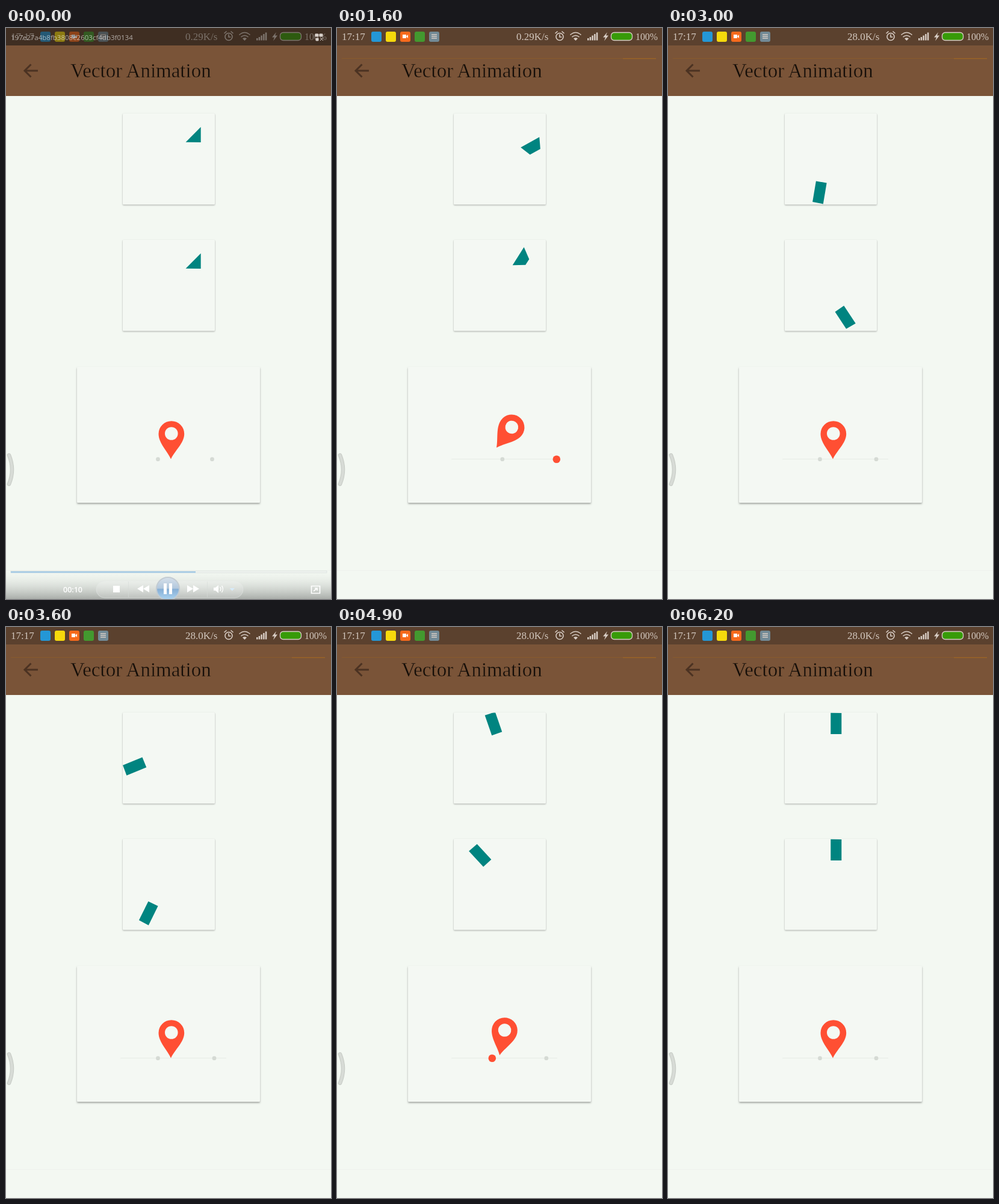
These frames come from a looping animation (540x949 px, 6.3 s). An HTML page:

```html
<!DOCTYPE html>
<html lang="en">
<head>
<meta charset="utf-8">
<title>Vector Animation</title>
<style>
html, body { margin: 0; width: 100%; height: 100%; overflow: hidden; background: #f3f8f2; }
svg { display: block; width: 540px; height: 949px; }
text { font-family: "Liberation Serif", serif; white-space: pre; }
.status { font-size: 17px; fill: #d3c8bf; }
.title { font-size: 33px; fill: #130d08; stroke: #7a5438; stroke-width: .5px; }
.sans { font-family: "Open Sans", sans-serif; fill: #fff; }
.card { fill: #f4f8f3; filter: drop-shadow(0 1px 1.2px rgba(0, 0, 0, .32)); }
.raised { filter: drop-shadow(0 2px 1.5px rgba(0, 0, 0, .32)); }
.line { fill: none; stroke: #d8cdc5; stroke-width: 1.6; }
</style>
</head>
<body>
<svg viewBox="0 0 540 949">
  <defs>
    <linearGradient id="shade" x2="0" y2="1">
      <stop stop-color="#f3f8f2" stop-opacity="0"/><stop offset="1" stop-color="#a9ada9"/>
    </linearGradient>
    <linearGradient id="glass" x2="0" y2="1">
      <stop stop-color="#d6e0ea"/><stop offset=".48" stop-color="#b3c8dd"/>
      <stop offset=".52" stop-color="#86aed5"/><stop offset="1" stop-color="#aed6f2"/>
    </linearGradient>
    <clipPath id="clipA"><rect x="194" y="142.5" width="153" height="151"/></clipPath>
    <clipPath id="clipB"><rect x="194" y="352.5" width="153" height="151"/></clipPath>
  </defs>

  <rect width="540" height="949" fill="#f3f8f2"/>
  <rect width="540" height="113" fill="#7a5438"/>
  <rect width="540" height="29" fill="#5b412e"/>
  <g id="streak" fill="#895a2c">
    <rect x="8" y="50" width="522" height="1"/>
    <rect x="475" y="50" width="55" height="1.5" fill="#9a6426"/>
  </g>

  <text class="status" x="8" y="20">17:17</text>
  <rect x="57" y="6" width="17" height="17" rx="3" fill="#2497d6"/>
  <rect x="81" y="6" width="17" height="17" rx="3" fill="#f6d90c"/>
  <rect x="105" y="6" width="17" height="17" rx="3" fill="#f76a1c"/>
  <path d="M109 11h6v6h-6zM115 14l3-3v6z" fill="#fff"/>
  <rect x="129" y="6" width="17" height="17" rx="3" fill="#43992f"/>
  <rect x="153" y="6" width="17" height="17" rx="3" fill="#728a96"/>
  <path d="M157 11h9M157 14h9M157 17h9" class="line"/>
  <text id="speed" class="status" x="298" y="20"></text>
  <g class="line">
    <circle cx="370" cy="14.5" r="6"/>
    <path d="M370 10.5v4.5h3.5M362.500 9l4-3.500M377.500 9l-4-3.500M387.500 11.500q9-8 18 0M390.500 15q6-5 12 0"/>
  </g>
  <path d="M393 17.500q3.500-2.500 7 0l-3.500 3.500zM416 17h2.500v3.500H416zM419.700 15h2.500v5.500h-2.500zM423.400 12.500h2.500v8h-2.500zM427.100 10h2.500v10.500h-2.500zM430.800 7.500h2.500v13h-2.500zM449 7l-7 8.500h4l-2 6 7-9h-4z" fill="#d8cdc5"/>
  <rect x="455.500" y="7.500" width="35" height="13" rx="5" fill="#379b08" stroke="#d8cdc5" stroke-width="1.300"/>
  <text class="status" x="496" y="20" style="font-size: 15.8px">100%</text>

  <path d="M53 71H31M41.500 60.500L31 71l10.500 10.500" fill="none" stroke="#4b3222" stroke-width="3"/>
  <text class="title" x="107" y="82">Vector Animation</text>

  <rect class="card" x="194" y="142" width="153" height="151.500" rx="1.500"/>
  <rect class="card" x="194" y="352" width="153" height="151.500" rx="1.500"/>
  <rect class="card raised" x="118" y="563" width="304" height="226" rx="1.500"/>
  <g fill="#008480">
    <g clip-path="url(#clipA)"><polygon id="shapeA"/></g>
    <g clip-path="url(#clipB)"><polygon id="shapeB"/></g>
  </g>
  <path id="track" d="M190 716.500H366" stroke="#eaefe9" stroke-width="1.500"/>
  <g id="dots"></g>
  <path id="pin" fill="#ff4f33" fill-rule="evenodd" d="M274 716.500C268 703 253.500 690 253.500 674.500A21.300 21.300 0 0 1 296.200 674.500C296.200 690 280 703 274 716.500ZM264 674a10.800 10.800 0 1 0 21.600 0a10.800 10.800 0 1 0-21.600 0Z"/>

  <g fill="none" stroke-linecap="round">
    <path d="M5 710q10 24 0 48" stroke="#c6cbc5" stroke-width="6.500"/>
    <path d="M5 710q10 24 0 48" stroke="#d7dbd6" stroke-width="4.500"/>
  </g>
  <rect y="901" width="540" height="1" fill="#eef2ed"/>

  <g id="player">
    <rect width="540" height="29" fill="#241c16" opacity=".5"/>
    <text class="sans" x="8" y="19.500" font-size="11.500" opacity=".6">197e27a4b8fb3808e2603cf4db3f0134</text>
    <path d="M514 10h5v4h-5zM521 10h5v4h-5zM515 17h4v4h-4zM522 16l5 5m0-5l-5 5" fill="#d8d0ca" stroke="#d8d0ca"/>
    <rect y="898" width="540" height="51" fill="url(#shade)"/>
    <rect x="8" y="902.500" width="525" height="3" fill="#f0f4f1" stroke="#d3dad8" stroke-width=".6"/>
    <rect x="8" y="903" width="307" height="2.500" fill="#a5cbe6"/>
    <text class="sans" x="95" y="938" font-size="12.500" font-weight="600">00:10</text>
    <rect x="150" y="919" width="244" height="28" rx="14" fill="#fff" fill-opacity=".18" stroke="#e3e7e4" stroke-opacity=".6"/>
    <path d="M203.500 920v26M334.500 920v26" stroke="#d6dad7" stroke-opacity=".6"/>
    <circle cx="269" cy="932" r="19" fill="url(#glass)" stroke="#c3ccd3" stroke-width="2"/>
    <path d="M178 927h11v11h-11zM228 926v12l-10-6zM238 926v12l-10-6zM301 926v12l10-6zM311 926v12l10-6zM262 923h5v18h-5zM271 923h5v18h-5zM345 930h3l5-4v13l-5-4h-3z" fill="#fff"/>
    <path d="M355.500 929q3 3.500 0 7M358.500 927q4 5.500 0 11" fill="none" stroke="#fff" stroke-width="1.300"/>
    <path d="M371.500 931h8.500l-4.200 4.500z" fill="#d6ebfa"/>
    <path d="M507.500 927.500h14v12h-14zM511 936l6-5m-4 0h4v4" fill="none" stroke="#fff" stroke-width="1.700"/>
  </g>
</svg>
<script>
const LOOP = 6300, STEP = 100;
const SPIN = 5665;
const HOP_START = 1260, HOP = 1260, HOP_PERIOD = 2500;
const SPACING = 90, FIRST_DOT = 252.5;

const $ = id => document.getElementById(id);
const ease = x => .5 - .5 * Math.cos(Math.PI * Math.min(1, Math.max(0, x)));
const show = (id, opacity) => $(id).setAttribute("opacity", opacity);

// A triangle splits its apex to become a bar while turning once around the card.
function drawShape(id, centerY, start, time) {
  const t = (time - start) / SPIN;
  const half = 17.5 * ease(2 * t);
  const angle = t < 0 ? 45 : 360 * ease(t);
  const shape = $(id);
  shape.setAttribute("points", `0,-40 0,-75.5 18,${-57.5 - half} 18,${-57.5 + half}`);
  shape.setAttribute("transform", `translate(270.3 ${centerY}) rotate(${angle})`);
}

// The dots slide left by two places, led by a red one, while the pin leans.
function drawPin(time) {
  const started = time >= HOP_START;
  const t = started ? (time - HOP_START) % HOP_PERIOD / HOP : 1;
  const moving = t < 1;
  const shift = moving ? 2 * SPACING * (1 - (1 - t) ** 1.5) : 0;
  let dots = "";
  for (let i = 0; i < 4; i++) {
    let x = FIRST_DOT + SPACING * i - shift;
    if (!moving && started && i === 1) x = 346;
    if (x < 187 || x > 371) continue;
    const red = moving && i === 2;
    dots += `<circle cx="${x}" cy="716.7" r="${red ? 6.3 : 3.4}" fill="${red ? "#ff4f33" : "#d5dad4"}"/>`;
  }
  $("dots").innerHTML = dots;
  const peak = .27;
  const lean = !moving ? 0 : t < peak ? ease(t / peak) : 1 - ((t - peak) / (1 - peak)) ** 2.4;
  $("pin").setAttribute("transform", `rotate(${35.5 * lean} 299 693)`);
  show("track", started ? 1 : 0);
}

function draw(now) {
  const time = Math.floor(now % LOOP / STEP) * STEP;
  drawShape("shapeA", 218, 72, time);
  drawShape("shapeB", 428, 503, time);
  drawPin(time);
  $("speed").textContent = time < 3000 ? "0.29K/s" : "28.0K/s";
  const fade = Math.max(0, 1 - time / 700);
  show("player", fade);
  show("streak", 1 - fade);
}

let origin;
function tick(now) {
  origin ??= now;
  draw(now - origin);
  requestAnimationFrame(tick);
}
draw(0);
requestAnimationFrame(tick);
</script>
</body>
</html>
```
